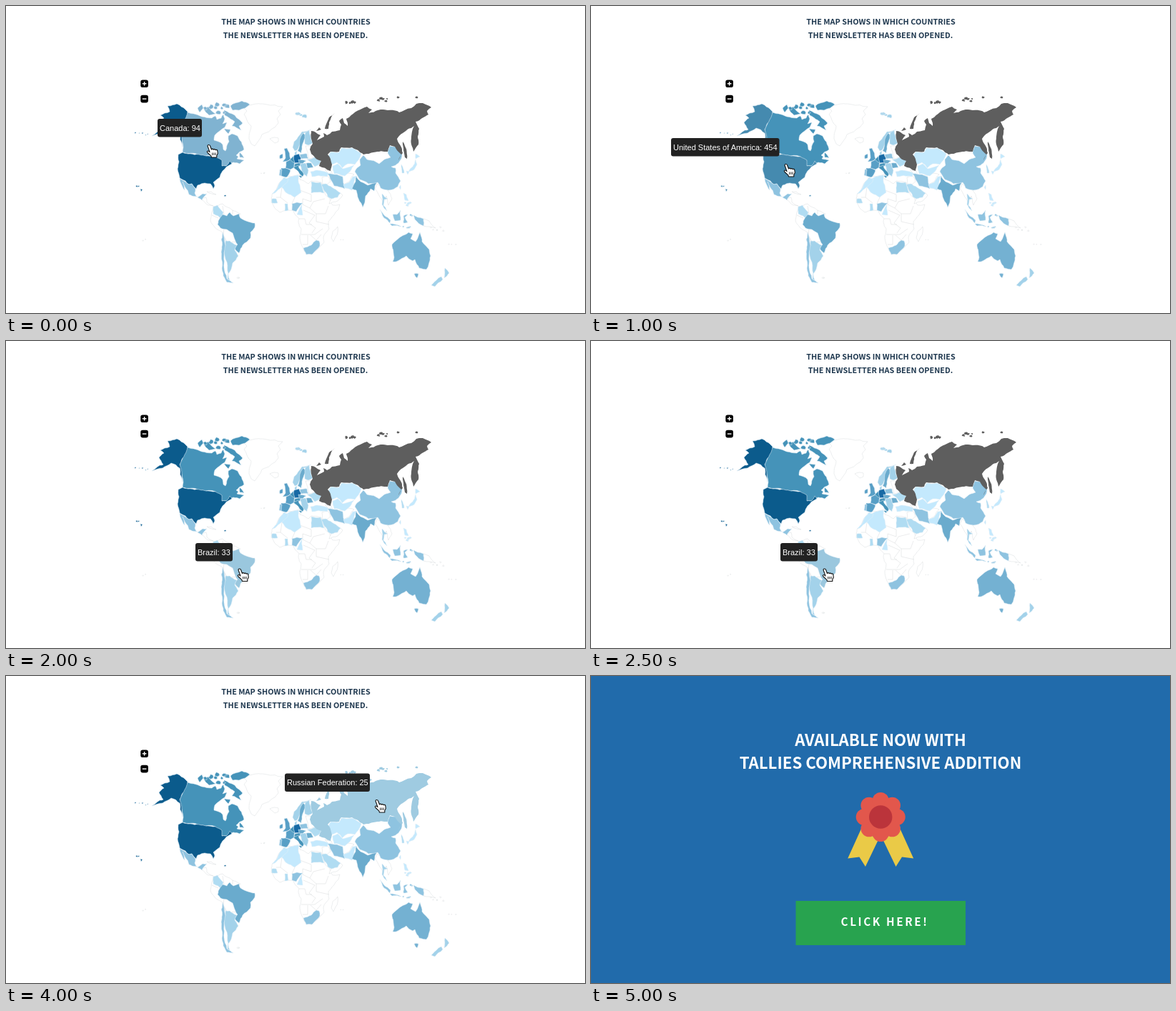
Recreate the animation shown at these times as an HTML page. Size 810 by 430 pixels, loop 9.5 s.

```html
<!DOCTYPE html>
<html lang="en">
<head>
<meta charset="utf-8">
<title>Newsletter map</title>
<style>
html,body{margin:0;width:100%;height:100%;overflow:hidden;background:#fff}
svg{display:block;width:100vw;height:100vh}
.head{font-family:"Noto Sans CJK JP","Noto Sans CJK SC","Noto Sans CJK",sans-serif;font-weight:700}
.tip{font:11px "Liberation Sans",Arial,sans-serif;fill:#fff}
</style>
</head>
<body>
<svg id="stage" viewBox="0 0 810 430"></svg>
<script>
const NS = 'http://www.w3.org/2000/svg';
const stage = document.getElementById('stage');

function add(parent, tag, attrs, text) {
  const el = document.createElementNS(NS, tag);
  for (const k in attrs) el.setAttribute(k, attrs[k]);
  if (text) el.textContent = text;
  parent.appendChild(el);
  return el;
}

function heading(parent, x, y, size, fill, text, extra) {
  return add(parent, 'text', {class: 'head', x, y, 'font-size': size, fill, 'text-anchor': 'middle', ...extra}, text);
}

// Splits long edges and nudges the middle; shared borders get the same nudge.
function rough(a, b) {
  const len = Math.hypot(b[0] - a[0], b[1] - a[1]);
  if (len < 5) return [a];
  const mx = (a[0] + b[0]) / 2, my = (a[1] + b[1]) / 2, t = mx * 7 + my * 3;
  const m = [mx + Math.sin(t) * len * .07, my + Math.cos(t * 1.7) * len * .07];
  return [...rough(a, m), ...rough(m, b)];
}

function coast(outline) {
  const pts = outline.split(' ').map(p => p.split(',').map(Number));
  const all = pts.flatMap((p, i) => rough(p, pts[(i + 1) % pts.length]));
  return 'M' + all.map(p => p.map(v => v.toFixed(1))).join(' ') + 'Z';
}

let seed = 7;
const rnd = () => (seed = seed * 16807 % 2147483647) / 2147483647;

const mapScene = add(stage, 'g', {});
add(mapScene, 'rect', {width: 810, height: 430, fill: '#fff'});
heading(mapScene, 405.5, 25.5, 10.85, '#1f384f', 'THE MAP SHOWS IN WHICH COUNTRIES');
heading(mapScene, 405, 45, 10.85, '#1f384f', 'THE NEWSLETTER HAS BEEN OPENED.');

const WHITE = '#fff', PALE = '#c4e9fd', SKY = '#b0dcf2', LIGHT = '#a3d2ea', SOFT = '#8ec3e0',
      OCEAN = '#74b1d2', MID = '#6aabcd', BLUE = '#589fc6', STRONG = '#4593b9', NAVY = '#0b5b8c', GREY = '#5e5e5e';
const active = [];

function shape(fill, d, name) {
  const stroke = fill === WHITE ? '#d9dcde' : fill === GREY ? 'none' : '#e3eff6';
  const el = add(mapScene, 'path', {d, fill, stroke, 'stroke-width': .5, 'stroke-linejoin': 'round'});
  if (name) active.push({el, fill, name});
}
const land = (fill, outline, name) => shape(fill, coast(outline), name);

// Small ragged islands scattered in a box
function islets(fill, x, y, w, h, count, size, name) {
  let d = '';
  for (let i = 0; i < count; i++) {
    const cx = x + w * (i + rnd()) / count, cy = y + h * rnd(), r = size * (.6 + .6 * rnd());
    for (let k = 0; k < 7; k++) {
      const a = k * Math.PI * 2 / 7, q = r * (.55 + .7 * rnd());
      d += (k ? 'L' : 'M') + (cx + q * 1.3 * Math.cos(a)).toFixed(1) + ' ' + (cy + q * Math.sin(a)).toFixed(1);
    }
    d += 'Z';
  }
  shape(fill, d, name);
}

// Blank areas
land(WHITE, '331,141 345,138 365,138 387,141 381,147 384,152 379,158 381,164 376,170 358,180 348,196 343,193 340,186 343,168 333,152 337,147');
land(WHITE, '369,186 375,184 381,185 381,190 376,192');
land(WHITE, '389,240 411,236 411,243 423,249 427,245 441,247 446,262 457,279 467,278 465,285 451,302 452,312 444,324 445,331 428,348 420,348 411,322 413,312 409,303 410,298 402,286 388,287 383,289 371,275 372,264 382,248');
land(WHITE, '464,309 464,317 458,330 455,325 457,316');
land(WHITE, '442,240 450,238 454,246 449,250 442,249');
land(WHITE, '455,270 468,262 471,265 464,273 452,277');
land(WHITE, '466,237 478,234 487,236 480,246 472,250');
land(WHITE, '519,249 530,256 534,258 540,270 535,279 532,266 527,276 516,256');
land(WHITE, '290,281 303,277 328,291 311,300 324,330 308,333 303,317 292,310 286,300');
land(WHITE, '273,271 280,268 281,275 290,280 283,279');
land(WHITE, '281,260 287,260 294,264 288,263');
land(WHITE, '584,298 592,301 601,311 592,309 584,308');
land(WHITE, '419,196 426,196 433,211 424,214');
land(WHITE, '446,229 455,231 458,238 451,235');
add(mapScene, 'path', {
  d: 'M411 258L427 264V274L415 270M404 268L400 277M386 254L384 268H378M394 276L384 268M415 270V278L425 283 430 274 446 270M425 283L434 291H447L451 280M434 291V302L452 306M416 286L432 293 424 304 433 311 428 318M410 298H418L420 306H428M413 320H432L443 312M415 334H422V321M426 321L434 328 441 320M303 280L305 292M317 286V292M288 293L297 297M305 312L304 321 309 330',
  fill: 'none', stroke: '#dadddf', 'stroke-width': .55
});

// North America
land(STRONG, '254,149 274,155 288,157 293,154 295,159 301,157 304,152 306,158 303,165 309,163 306,170 292,181 291,188 303,194 304,201 307,203 312,190 311,182 316,179 324,182 333,201 322,209 325,211 323,214 333,216 327,221 318,219 308,224 302,224 293,211 247,205 248,198 246,187 243,174', 'Canada');
land(STRONG, '305,146 320,153 331,164 326,168 329,174 316,168 320,162 306,153', 'Canada');
land(STRONG, '314,140 330,133 341,138 326,146 317,146', 'Canada');
land(STRONG, '277,145 283,141 293,151 284,153', 'Canada');
land(STRONG, '268,143 274,138 276,143 271,149', 'Canada');
land(STRONG, '305,172 314,173 311,179', 'Canada');
land(STRONG, '327,205 333,213 327,212', 'Canada');
islets(STRONG, 279, 136, 34, 8, 7, 3, 'Canada');
islets(STRONG, 294, 147, 12, 3, 2, 2.8, 'Canada');
land(NAVY, '247,205 270,208 293,211 302,216 302,224 308,224 313,217 316,221 303,231 299,240 290,247 292,252 290,256 286,249 278,248 268,251 266,256 260,249 256,250 251,245 243,241 240,228 242,218 241,208', 'USA');
land(NAVY, '226,140 239,137 254,148 243,173 246,187 247,198 243,178 231,171 219,178 204,182 220,173 214,163 221,157 216,153 222,150 229,148', 'USA');
islets(NAVY, 178, 177, 24, 4, 5, .9, 'USA');
islets(NAVY, 183, 251, 4, 2, 2, .9, 'USA');
land(NAVY, '188,256 191,257 189,260', 'USA');
islets(NAVY, 306, 265.5, 1, 1, 1, 1, 'USA');
land(SOFT, '243,241 256,250 260,249 265,256 264,262 268,268 275,263 281,263 274,272 256,264 247,246 250,258 245,249');

// South America
land(SKY, '290,281 296,279 304,289 302,298 290,291');
land(MID, '303,292 309,294 313,289 318,294 326,291 328,297 348,304 348,310 342,317 342,325 331,335 326,346 320,340 324,334 317,318 309,313 300,311 296,306 297,301', 'Brazil');
land(SOFT, '303,317 307,335 305,350 309,382 318,388 309,387 304,378 302,340');
land(LIGHT, '307,329 313,329 323,335 320,342 325,350 317,360 311,375 313,384 310,383 306,350');

// Europe
land(LIGHT, '404,203 401,198 403,190 414,176 427,173 416,178 407,202');
islets(LIGHT, 405, 150, 13, 5, 4, 2.3);
land(MID, '408,203 411,187 416,178 420,182 415,193 413,206');
land(LIGHT, '419,177 424,174 429,192 423,195 418,193');
land(LIGHT, '404,205 407,203 407,209 404,209');
land(BLUE, '389,200 393,199 398,214 394,217 387,218 391,213');
land(BLUE, '383,209 387,207 387,213 383,214');
land(BLUE, '392,218 398,215 404,219 403,226 398,229 391,227');
land(BLUE, '385,227 391,227 398,230 392,240 385,238');
land(SOFT, '383,229 386,229 385,238 382,237');
land('#186aa5', '403,209 410,207 413,213 410,220 404,220 402,215');
land(STRONG, '397,215 402,210 404,220');
land(STRONG, '404,221 413,220 411,224 403,225');
land(STRONG, '402,226 409,223 410,227 417,234 415,239 407,230');
land(STRONG, '409,238 414,238 413,241');
land(SOFT, '411,208 421,207 423,214 413,214');
land(MID, '409,215 420,217 415,221 410,220');
land(MID, '420,220 427,220 430,226 421,227');
land(LIGHT, '411,222 419,220 423,230 421,239 417,236');
land(SKY, '421,215 432,212 441,217 438,222 432,225');
land(PALE, '426,232 435,230 451,234 449,239 428,239');

// Africa and western Asia
land(PALE, '387,249 398,239 409,237 413,261 404,268 386,254');
land(PALE, '389,240 395,242 394,246 376,262 372,263 383,247');
land(SKY, '427,246 440,247 445,262 427,262');
land(SKY, '372,270 378,270 380,276 372,276');
land(SKY, '390,277 394,277 395,286 390,287');
land(SOFT, '400,277 407,275 415,276 406,288 400,286');
land(PALE, '411,283 414,277 415,293 407,292');
land(SOFT, '416,339 427,335 434,328 438,329 439,336 428,348 420,348');
land(SKY, '441,250 448,249 456,254 468,262 464,268 455,270 450,267');
land(SOFT, '450,235 463,236 471,239 474,256 459,252');
land(PALE, '451,211 455,204 466,205 469,199 484,199 497,207 488,222 478,221 470,227 463,219 456,222');
land(PALE, '457,224 464,221 471,228 487,223 474,238 459,235');
land(PALE, '474,255 472,250 480,247 485,239 490,238 484,258');

// Southern and eastern Asia
land(MID, '490,238 496,246 506,251 519,247 515,259 510,256 509,259 503,266 502,275 499,282 490,258 484,256 489,246');
land(SOFT, '488,232 496,223 495,215 500,209 505,215 522,221 538,212 534,206 537,196 545,197 554,207 553,214 549,220 539,225 545,227 545,234 552,245 548,253 535,258 524,255 520,247 507,249 495,243');
land(SKY, '553,222 557,234 554,234');
land(PALE, '573,207 579,211 573,214');
land(PALE, '573,215 575,222 571,229 563,232 569,225');
land(PALE, '560,231 564,232 562,236');
land(PALE, '550,254 552,251 552,257');
land(PALE, '556,262 560,264 563,273 558,272');
islets(PALE, 559, 275, 8, 6, 4, 2);
land(LIGHT, '526,263 534,270 529,271 528,279 533,287 526,278');
land(SOFT, '523,285 538,300 537,304 529,297');
land(SOFT, '537,305 545,306 553,309 540,308');
land(SOFT, '541,292 547,292 552,286 552,300 544,301');
land(SOFT, '556,294 562,292 558,296 562,303 556,304');
land(SOFT, '570,293 576,296 584,298 584,308 572,299');
islets(SOFT, 556, 309, 11, 2, 4, 1.1);
islets(SOFT, 565, 292, 3, 7, 2, 1.1);

// Oceania
land(OCEAN, '540,334 551,324 559,320 563,317 569,319 566,326 573,330 579,317 582,330 592,341 594,350 588,369 578,367 572,355 569,357 560,350 546,358 541,358 543,352', 'Australia');
land(OCEAN, '571,375 577,375 575,381', 'Australia');
land(LIGHT, '614,367 620,374 613,381');
land(LIGHT, '609,379 611,383 600,393 595,391');

// Russia
land(GREY, '427,175 440,181 435,188 445,183 444,178 449,181 456,176 467,174 469,166 466,161 471,157 473,164 478,168 476,158 505,141 512,145 507,150 524,145 550,149 567,143 574,137 583,136 595,142 589,147 591,152 573,162 578,172 577,194 570,204 567,183 571,168 555,178 547,186 555,206 549,216 553,208 544,197 537,195 534,204 514,205 500,208 484,198 469,198 466,204 454,204 450,208 456,222 454,231 438,224 441,217 427,207 425,201 429,193', 'Russia');
land(GREY, '446,172 449,163 452,156 460,150 452,163 451,172', 'Russia');
land(GREY, '555,190 558,196 561,214 558,212', 'Russia');
land(GREY, '434,175 438,170 441,173', 'Russia');
islets(GREY, 475, 132, 14, 4, 4, 2.2, 'Russia');
islets(GREY, 519, 129, 16, 5, 5, 1.7, 'Russia');
islets(GREY, 545, 127, 5, 2, 1, 1.5, 'Russia');
islets(GREY, 574, 127, 5, 1, 1, 2, 'Russia');

// Faint ocean islands
islets(WHITE, 356, 233, 8, 4, 3, .6);
islets(WHITE, 191, 326, 5, 3, 2, .5);
islets(WHITE, 466, 325, 6, 3, 2, .6);
islets(WHITE, 593, 308, 20, 9, 6, .9);
islets(WHITE, 615, 331, 16, 3, 3, .6);
islets(WHITE, 323, 380, 4, 1, 2, 1);

for (const [y, sign] of [[103.5, 'M190.8 108.8h5.6M193.6 106v5.6'], [124.8, 'M190.8 130.1h5.6']]) {
  add(mapScene, 'rect', {x: 188.3, y, width: 10.6, height: 10.6, rx: 2.8, fill: '#050505'});
  add(mapScene, 'path', {d: sign, stroke: '#fff', 'stroke-width': 1.4});
}

const tipBox = add(mapScene, 'rect', {height: 25.5, rx: 3, fill: '#222'});
const tipText = add(mapScene, 'text', {class: 'tip'});
const hand = add(mapScene, 'g', {});
add(hand, 'path', {
  d: 'M0 1C0-1 3-1 3.6 1L5.5 6C6 4.7 8 4.8 8.4 6.3 9 5.2 10.7 5.4 11.2 6.7 12 5.9 13.5 6.3 13.8 7.6L14.3 11.5 12.8 14.5V17H5.5L4.8 14.8 0 10.5C-1.6 8.7 0 7.3 1.8 8.6L3 9.6Z',
  fill: '#fff', stroke: '#111', 'stroke-width': 1.1, 'stroke-linejoin': 'round'
});
add(hand, 'path', {d: 'M6.7 10.5v3.5M8.9 10.5v3.5M11.1 10.5v3.5', stroke: '#111', 'stroke-width': .9});

// Closing card
const offer = add(stage, 'g', {});
add(offer, 'rect', {width: 810, height: 430, fill: '#216bab'});
heading(offer, 405, 98, 22.2, '#fff', 'AVAILABLE NOW WITH');
heading(offer, 405, 129.5, 22.2, '#fff', 'TALLIES COMPREHENSIVE ADDITION');
for (const side of [-1, 1])
  add(offer, 'path', {
    d: 'M27 16L46 58 29.8 56 21.3 69.5 3.3 32Z', fill: '#eaca47',
    transform: `translate(405.2 197.5) scale(${side} 1)`
  });
const rosette = add(offer, 'g', {fill: '#e2574c', transform: 'translate(405.2 197.5)'});
add(rosette, 'circle', {r: 28});
for (let i = 0; i < 8; i++)
  add(rosette, 'circle', {cx: 23, r: 11.5, transform: `rotate(${i * 45})`});
add(rosette, 'circle', {r: 16.2, fill: '#bb343b'});
add(offer, 'rect', {x: 286.5, y: 315, width: 237.5, height: 62, fill: '#28a34f'});
heading(offer, 349.5, 350.3, 15.3, '#fff', 'CLICK HERE!', {'text-anchor': 'start', 'letter-spacing': 2.6});

const hoverFill = {Canada: '#80b3d1', USA: '#458aaf', Brazil: '#9ac7de', Australia: '#9ecae0', Russia: '#9fcbe1'};

// country, label, tooltip x, y, width, then pointer x, y
const steps = [
  ['Canada', 'Canada: 94', 212, 158, 62, 282, 195],
  ['USA', 'United States of America: 454', 112, 185, 151.5, 271, 222],
  ['Brazil', 'Brazil: 33', 265, 283, 52, 325, 319.5],
  ['Australia', 'Australia: 25', 488.5, 299, 67, 562.5, 335.5],
  ['Russia', 'Russian Federation: 25', 390, 136.5, 119, 517, 174]
];

let shown = -1;
function render(ms) {
  const step = Math.min(5, Math.floor(ms % 9500 / 1000));
  if (step === shown) return;
  shown = step;
  const onMap = step < 5;
  mapScene.style.display = onMap ? '' : 'none';
  offer.style.display = onMap ? 'none' : '';
  if (!onMap) return;
  const [country, label, x, y, width, px, py] = steps[step];
  for (const {el, fill, name} of active)
    el.setAttribute('fill', name === country ? hoverFill[name] : fill);
  tipBox.setAttribute('x', x);
  tipBox.setAttribute('y', y);
  tipBox.setAttribute('width', width);
  tipText.setAttribute('x', x + 3);
  tipText.setAttribute('y', y + 16.8);
  tipText.textContent = label;
  hand.setAttribute('transform', `translate(${px} ${py})`);
}

const start = performance.now();
function loop() {
  render(performance.now() - start);
  requestAnimationFrame(loop);
}
loop();
</script>
</body>
</html>
```
